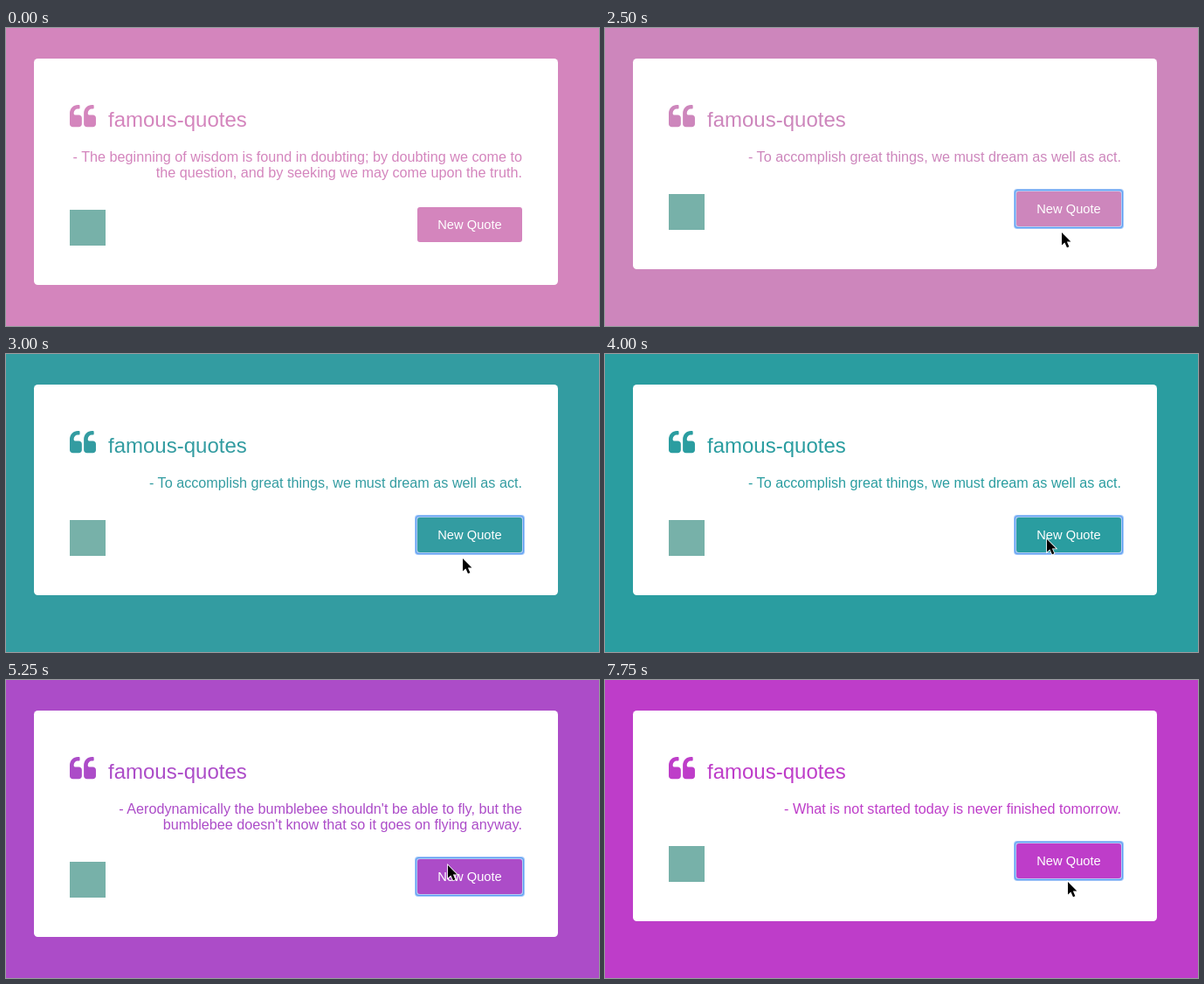
Animation of 679x341 px, one loop 8 s. Source, as an HTML page:

```html
<!DOCTYPE html>
<html lang="en">
<head>
<meta charset="utf-8">
<title>Quote machine</title>
<style>
  html, body { margin: 0; width: 100%; height: 100%; overflow: hidden; }
  svg { display: block; width: 679px; height: 341px; font-family: "Liberation Sans", Arial, sans-serif; }
</style>
</head>
<body>
<svg viewBox="0 0 679 341">
  <defs>
    <path id="mark" d="M768 960v384q0 80-56 136t-136 56h-384q-80 0-136-56t-56-136v-704q0-104 40.5-198.5t109.5-163.5 163.5-109.5 198.5-40.5h64q26 0 45 19t19 45v128q0 26-19 45t-45 19h-64q-106 0-181 75t-75 181v32q0 40 28 68t68 28h224q80 0 136 56t56 136z"/>
  </defs>
  <g id="themed">
    <rect width="679" height="341"/>
    <rect id="card" x="32" y="35" width="600" rx="4.5" fill="#fff"/>
    <g transform="translate(73 85.7) scale(.018)">
      <use href="#mark"/>
      <use href="#mark" x="896"/>
    </g>
    <text x="117" y="113" font-size="24">famous-quotes</text>
    <g font-size="16.2" text-anchor="end">
      <text id="line1" x="591" y="153"></text>
      <text id="line2" x="591" y="171"></text>
    </g>
    <g id="footer">
      <rect x="73" y="208" width="41" height="41" fill="#77b1a9"/>
      <g id="ring">
        <rect x="468" y="202" width="126" height="46" rx="4" fill="#5b9df3" opacity=".55"/>
        <rect x="469" y="203" width="124" height="44" rx="3.5" fill="#5b9df3"/>
        <rect x="470" y="204" width="122" height="42" rx="3" fill="#b4cff5"/>
      </g>
      <rect x="471" y="205" width="120" height="40" rx="3"/>
      <text x="531" y="230" font-size="14.7" text-anchor="middle" fill="#fff">New Quote</text>
    </g>
  </g>
  <path id="cursor" d="M1 1V15.6L4.4 12.4L7 18.3L9.4 17.3L6.9 11.5H11.4Z" stroke="#fff" stroke-width="1.6" paint-order="stroke"/>
</svg>
<script>
const LOOP = 8000, STEP = 250, CLICK = 1500;
const el = id => document.getElementById(id);

const pink = [212, 133, 189], teal = [42, 157, 160], magenta = [196, 61, 207];
const mix = (a, b, p) => a.map((v, i) => v + (b[i] - v) * p);

// Every track lists [start time, value]; a value holds until the next one.
const colors = [
  [0, pink],
  [2500, mix(pink, teal, .04)], [2750, mix(pink, teal, .71)], [3000, mix(pink, teal, .95)], [3250, teal],
  [5000, mix(teal, magenta, .5)], [5250, mix(teal, magenta, .844)], [5500, magenta],
  [7750, [190, 61, 201]]
];
const quotes = [
  [0, ["- The beginning of wisdom is found in doubting; by doubting we come to",
       "the question, and by seeking we may come upon the truth."]],
  [2500, ["- To accomplish great things, we must dream as well as act."]],
  [5000, ["- Aerodynamically the bumblebee shouldn't be able to fly, but the",
          "bumblebee doesn't know that so it goes on flying anyway."]],
  [7750, ["- What is not started today is never finished tomorrow."]]
];
const pointer = [
  [0, null], [750, [84, 100]], [1000, [380, 239]], [1250, [496, 224]], [1500, [509, 232]],
  [1750, [522, 232]], [2500, [522, 233]], [3250, [509, 234]], [3500, [505, 222]],
  [3750, [505, 212]], [4000, [505, 211]], [6500, [520, 223]], [6750, [529, 230]]
];
const at = (track, t) => track.findLast(([start]) => start <= t)[1];

function draw(now) {
  const t = Math.floor(now % LOOP / STEP) * STEP;
  const [first, second = ""] = at(quotes, t);
  const shift = second ? 0 : -18;
  const pos = at(pointer, t);

  el("themed").setAttribute("fill", `rgb(${at(colors, t).map(Math.round)})`);
  el("line1").textContent = first;
  el("line2").textContent = second;
  el("card").setAttribute("height", 259 + shift);
  el("footer").setAttribute("transform", `translate(0 ${shift})`);
  el("ring").style.display = t >= CLICK ? "" : "none";
  el("cursor").style.display = pos ? "" : "none";
  if (pos) el("cursor").setAttribute("transform", `translate(${pos})`);
}

const begin = performance.now();
function tick() {
  draw(performance.now() - begin);
  requestAnimationFrame(tick);
}
tick();
</script>
</body>
</html>
```
